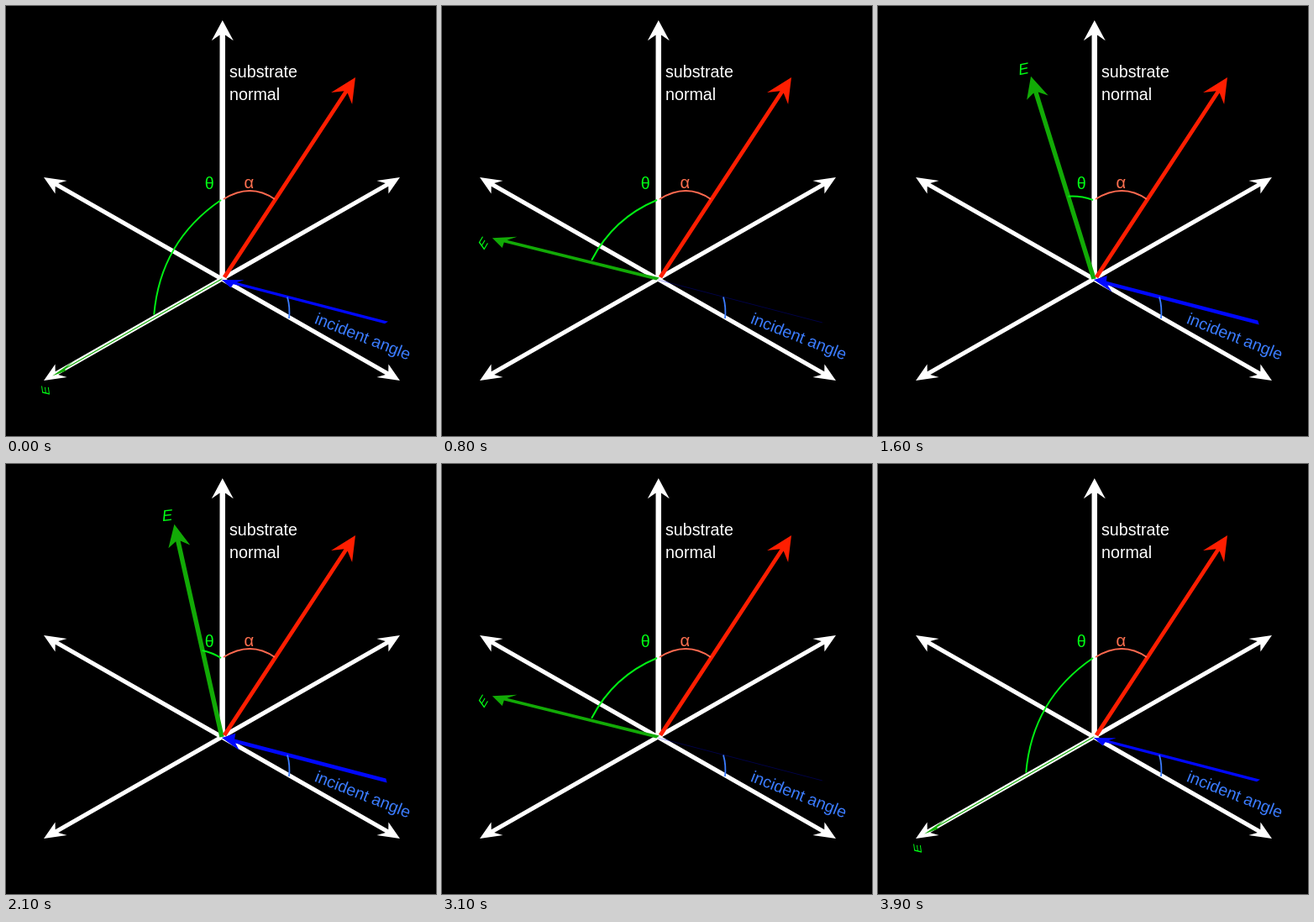
Recreate the animation shown at these times as an HTML page with a canvas. Size 512x512 px, loop 4 s.

```html
<!DOCTYPE html>
<html lang="en">
<head>
<meta charset="utf-8">
<title>Polarisation angle</title>
<style>
  html, body { margin: 0; width: 100%; height: 100%; overflow: hidden; background: #000; }
  canvas { display: block; width: 512px; height: 512px; }
</style>
</head>
<body>
<canvas id="stage" width="512" height="512"></canvas>
<script>
const ctx = document.getElementById('stage').getContext('2d');
const FONT = '"Liberation Sans", Arial, sans-serif';
const STEP = 100, HALF = 20;
const RAD = Math.PI / 180;
const ORIGIN = [257, 325];
const BEAM = [191, 52];

// Flat arrow: base point, length vector, half-width vector of the head
function arrow(base, len, side, color, shaft = 0.25, barb = 0.1, notch = 0.08) {
  const at = (along, across) => [
    base[0] + len[0] * along + side[0] * across,
    base[1] + len[1] * along + side[1] * across
  ];
  const points = [
    at(0, shaft), at(1 - notch, shaft), at(1 - barb, 1), at(1, 0),
    at(1 - barb, -1), at(1 - notch, -shaft), at(0, -shaft)
  ];
  ctx.fillStyle = color;
  ctx.beginPath();
  points.forEach(p => ctx.lineTo(p[0], p[1]));
  ctx.fill();
}

function curve(x0, y0, cx, cy, x1, y1, color, width) {
  ctx.strokeStyle = color;
  ctx.lineWidth = width;
  ctx.beginPath();
  ctx.moveTo(x0, y0);
  ctx.quadraticCurveTo(cx, cy, x1, y1);
  ctx.stroke();
}

function label(text, x, y, color, angle = 0, size = 19.7) {
  ctx.save();
  ctx.translate(x, y);
  ctx.rotate(angle * RAD);
  ctx.font = `${size}px ${FONT}`;
  ctx.textAlign = 'left';
  ctx.textBaseline = 'alphabetic';
  ctx.fillStyle = color;
  ctx.fillText(text, 0, 0);
  ctx.restore();
}

function axes() {
  for (const sx of [-1, 1]) {
    for (const sy of [-1, 1]) {
      arrow(ORIGIN, [212 * sx, 121 * sy], [7 * sx, -7.8 * sy], '#fff', 0.25, 0.097, 0.073);
    }
  }
  arrow([257.6, 325], [0.2, -308], [13, 0], '#fff', 0.25, 0.079, 0.057);
}

// The field vector sweeps an ellipse: the projected circle around the beam
function fieldVector(tilt) {
  const s = Math.sin(tilt), c = Math.cos(tilt);
  return {
    len: [-209 * s, 45.7 * s - 276 * c],
    turn: [209 * c, -276 * s - 45.7 * c]
  };
}

// The letter turns with the field vector, foreshortened in both directions
function fieldLabel(tip, degrees) {
  const bars = (degrees - 8) * RAD, spine = (degrees - 24) * RAD;
  ctx.save();
  ctx.transform(
    0.92 * Math.cos(bars), -0.8 * Math.sin(bars),
    0.65 * Math.sin(spine), 0.95 * Math.cos(spine),
    tip[0] - 8 - 3 * Math.sin((degrees - 15) * 2 * RAD),
    tip[1] - 11 + (degrees - 15) * 0.311
  );
  ctx.font = `20px ${FONT}`;
  ctx.textAlign = 'center';
  ctx.fillStyle = '#00ff14';
  ctx.fillText('E', 0, 7);
  ctx.restore();
}

function thetaArc(len, degrees) {
  const x0 = 256, y0 = 231;
  const x1 = 256 + len[0] * 0.395, y1 = 322 + len[1] * 0.395;
  const bow = 0.07 + degrees * 0.0016;
  const cx = (x0 + x1) / 2 - (y1 - y0) * bow;
  const cy = (y0 + y1) / 2 + (x1 - x0) * bow;
  curve(x0, y0, cx, cy, x1, y1, '#00f014', 2);
}

function beam(len) {
  curve(453, 377, 355, 351.5, 257, 326, '#0008ff', 0.25);
  arrow([453, 377], [-196, -51], [len[0] * 0.04, len[1] * 0.04], '#0008ff', 0.25, 0.095, 0.08);
}

function draw(step) {
  const p = (step < HALF ? step : 2 * HALF - 1 - step) / (HALF - 1);
  const degrees = 105 - 90 * p * p * (3 - 2 * p);
  const { len, turn } = fieldVector(degrees * RAD);
  const side = [0, 1].map(i => (turn[i] * 0.062 + BEAM[i] * 0.07) / 2);
  const tip = [ORIGIN[0] + len[0], ORIGIN[1] + len[1]];

  ctx.fillStyle = '#000';
  ctx.fillRect(0, 0, 512, 512);

  axes();
  arrow(ORIGIN, len, side, '#12aa06', 0.21, 0.105, 0.08);
  thetaArc(len, degrees);
  fieldLabel(tip, degrees);

  beam(len);
  arrow([260, 323], [156, -238], [12.5, 7], '#ff1e00', 0.165, 0.105, 0.073);

  curve(259, 230, 291, 210, 320, 230, '#ff6a50', 2);
  curve(335, 346.5, 338.5, 359, 337, 372, '#3b7cff', 1.8);

  label('substrate', 266, 84.5, '#fff');
  label('normal', 266, 111.5, '#fff');
  label('θ', 236.7, 218, '#00ff14');
  label('α', 283.5, 216.5, '#ff7050', 0, 20.2);
  label('incident angle', 366.5, 377.5, '#3b7cff', 21.5, 19.5);
}

const start = performance.now();
function tick() {
  const t = performance.now() - start;
  draw(Math.floor(t / STEP) % (2 * HALF));
  requestAnimationFrame(tick);
}
tick();
</script>
</body>
</html>
```
